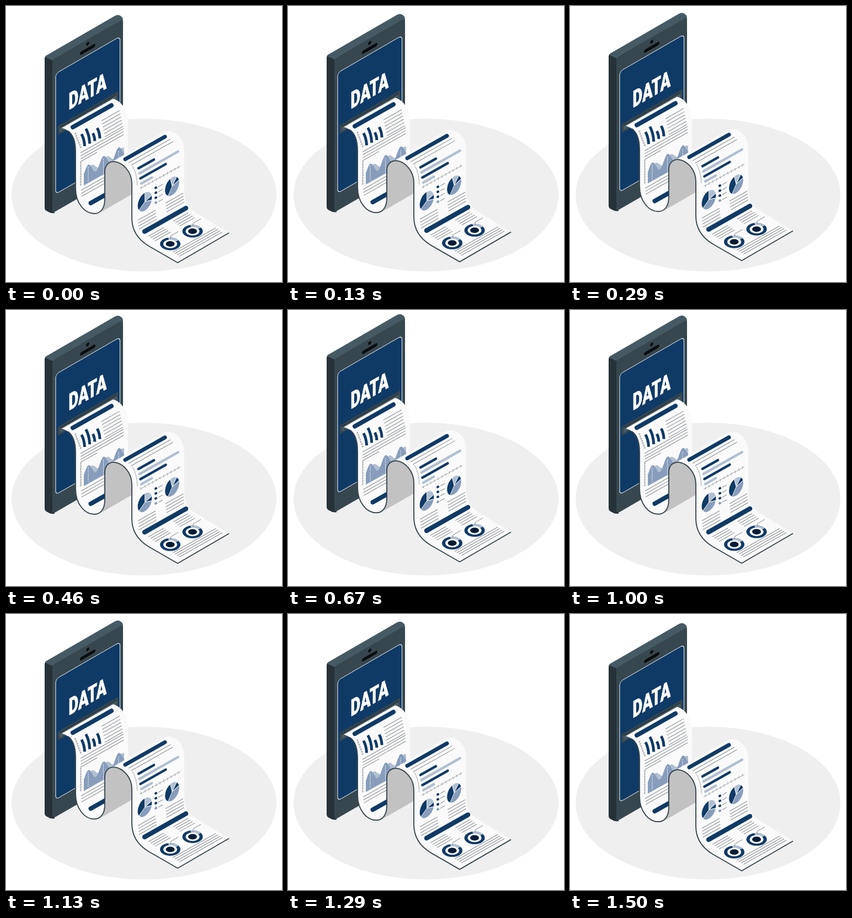
Recreate the animation shown at these times as an HTML page. Size 500 by 500 pixels, loop 1540 ms.

```html
<!DOCTYPE html>
<html lang="en">
<head>
<meta charset="utf-8">
<title>Data report</title>
<style>
  html, body { margin: 0; height: 100%; overflow: hidden; background: #fff; }
  svg { display: block; width: 100%; height: 100%; }
  text { font: 900 42px Roboto, sans-serif; fill: #fff; stroke: #fff; stroke-width: .8; stroke-linejoin: round; }
</style>
</head>
<body>
<svg viewBox="0 0 500 500">
  <ellipse cx="250" cy="342.5" rx="240" ry="138.5" fill="#efefef"/>
  <g id="float">
    <!-- phone: side, top, then everything on the skewed front -->
    <path fill="#263238" d="M70 96Q70 91 74 89L88 97V375Q81 376 77 373L73 371Q70 369 70 365Z"/>
    <path fill="#455a64" d="M71 92.500Q72 90.500 75 88.500L197 18Q202 15 206 17L209 19Q212 21 212 27L88 99Q84 99 83 98Z"/>
    <g transform="matrix(1 -.577 0 1 84 97.500)">
      <rect width="128" height="278" rx="5" fill="#37474f"/>
      <rect x="6" y="28.500" width="116.500" height="218" rx="6" fill="#103a66" stroke="#f4f6f8"/>
      <path d="M53 18H75" stroke="#0a0d0f" stroke-width="6" stroke-linecap="round"/>
      <circle cx="64" cy="8" r="3" fill="#0a0d0f"/>
      <text transform="translate(29.500 108) scale(.65 1)">DATA</text>
      <rect x="9.500" y="126" width="110" height="16" fill="#37474f"/>
      <rect x="13" y="129" width="103.500" height="10" fill="#455a64"/>
      <path d="M13 130H116.500" stroke="#263238" stroke-width="2"/>
    </g>

    <path fill="#fafafa" d="M101 221L194 168C207 171 220 186 221 208V264L195 290L179 300V350C179 368 170 376 160 376C143 376 126 358 126 330V264C126 238 117 225 101 221Z"/>
    <g id="upper"></g>
    <path fill="#c2c2c2" d="M179 300C179 288 187 281 197 282C212 284 228 300 228 322V341L171 374Q179 366 179 350Z"/>
    <path fill="#fafafa" d="M187 285L285 229C300 221 323 235 323 262V338C323 356 331 366 345 375L404 411L311 465L258 434.500C236 421 228 404 228 384V322C228 300 212 284 197 282Q191 282 187 285Z"/>
    <path fill="none" stroke="#37474f" stroke-width="1.900" stroke-linejoin="round" d="M112 226C122 233 126 246 126 264V330C126 358 143 376 160 376C170 376 179 368 179 350V300C179 288 187 281 197 282C212 284 228 300 228 322V384C228 404 236 421 258 434.500L311 465L404 411"/>
    <g id="lower"></g>
  </g>
</svg>
<script>
const NAVY = '#103a66', MID = '#879dbb', PALE = '#b0bfd2', GRAY = '#8b9093', PAPER = '#fafafa';
const SLOPE = -.565;

let layer;
const useLayer = id => layer = document.getElementById(id);

function add(tag, attrs) {
  const el = document.createElementNS('http://www.w3.org/2000/svg', tag);
  for (const key in attrs) el.setAttribute(key, attrs[key]);
  layer.append(el);
}

const stroke = (d, color = GRAY, width = 1.1, extra = {}) =>
  add('path', { d, fill: 'none', stroke: color, 'stroke-width': width, ...extra });

// Segment running along the shared isometric slope
const along = (x, y, length) => `M${x} ${y}l${length} ${length * SLOPE}`;

const bar = (x, y, length, color, width) =>
  stroke(along(x, y, length), color, width, { 'stroke-linecap': 'round' });

// Lines of text, each shifted by (dx, dy)
function rows(x, y, length, count, dx = .6, dy = 5.4) {
  for (let i = 0; i < count; i++) stroke(along(x + i * dx, y + i * dy, length));
}

// Axis with evenly spaced tick marks of half-size (tx, ty)
function axis(x, y, w, h, count, tx, ty) {
  let d = `M${x} ${y}l${w} ${h}`;
  for (let i = 0; i < count; i++) {
    const k = (i + .5) / count;
    d += `M${x + w * k - tx} ${y + h * k - ty}l${2 * tx} ${2 * ty}`;
  }
  stroke(d, GRAY, .8);
}

// Column chart leaning back with the curl of the paper
function columns(x, y, heights) {
  heights.forEach((h, i) => {
    const bx = x + i * 9.2, by = y - i * 4.7;
    stroke(`M${bx} ${by}q${-h * .03} ${-h * .6} ${-h * .26} ${-h}`, NAVY, 5);
  });
}

// Wavy area over a sloping base
function area(color, amplitude, shift) {
  let d = 'M141 325';
  for (let x = 141; x <= 214; x++) {
    const wave = Math.cos((x - 149 - shift) / 27.5 * 2 * Math.PI);
    d += `L${x} ${302 + (x - 141) * SLOPE - amplitude * wave}`;
  }
  add('path', { d: d + 'V284Z', fill: color });
}

// Slices are [end angle, colour], clockwise from the start angle
function pie(x, y, start, slices) {
  const r = 15.3;
  const at = deg => [r * Math.sin(deg * Math.PI / 180), -r * Math.cos(deg * Math.PI / 180)];
  for (const [end, fill] of slices) {
    add('path', {
      d: `M0 0L${at(start)}A${r} ${r} 0 0 1 ${at(end)}Z`,
      fill, stroke: PAPER, 'stroke-width': .9,
      transform: `matrix(.866 -.5 0 1.08 ${x} ${y})`
    });
    start = end;
  }
}

function donut(x, y) {
  const disc = (r, fill) => add('ellipse', { cx: x, cy: y, rx: r, ry: r * .62, fill });
  disc(18.5, NAVY);
  add('path', { d: `M${x} ${y}l-4 -11.2q12 -1.8 19 4.7z`, fill: PALE });
  disc(12.5, PAPER);
  disc(8, '#071c36');
  stroke(`M${x + 1} ${y - 10}v-4.500l14 -8`, '#606a70', .8);
}

useLayer('upper');
bar(121, 219.5, 70, NAVY, 8);
columns(142.5, 254, [22, 27, 14, 19]);
axis(125, 229, 11, 29, 7, 2, -1);
rows(173, 208, 33, 6, 1.2, 5.8);
rows(135, 266, 78, 3, .2);
rows(135, 282, 30, 1);
area(PALE, 6, 6);
area(MID, 10, 0);
for (let i = 0; i < 3; i++)
  stroke(`M${149 + i * 27.5} ${291 - i * 14}v28`, '#fff', 1, { 'stroke-dasharray': '2 1.5' });
axis(135.5, 282, 0, 44, 9, 1.7, -1);
rows(136, 334, 43, 3);
bar(153.5, 357, 28, NAVY, 8);

useLayer('lower');
bar(216, 277.5, 72, NAVY, 7);
rows(222, 284, 76, 2, 4.5, 4.5);
stroke('M229 290Q237 302 238 325', GRAY, .8);
[28, 70, 46, 19].forEach((length, i) =>
  bar(240 + i * 1.7, 294 + i * 9.2, length, i % 2 ? PALE : NAVY, 4.5));
axis(242, 331, 74, -41, 11, .3, 2.3);
pie(251.5, 354.5, 0, [[75, PALE], [105, NAVY], [235, MID], [360, NAVY]]);
pie(301, 326.5, -15, [[40, PALE], [75, NAVY], [215, MID], [345, NAVY]]);
for (let i = 0; i < 4; i++) {
  const y = 329.5 + i * 9;
  bar(271, y, 1, i < 3 ? NAVY : MID, 4.2);
  rows(276, y - 2, 8, 1);
}
rows(239, 388, 32, 4);
rows(289, 357, 32, 4);
bar(251, 408.5, 75, NAVY, 8.5);
rows(258, 417, 28, 4, 4, 2.8);
rows(303, 390, 27, 4, 4, 2.8);
rows(302, 446, 78, 4, 4, 2.5);
donut(297.5, 431);
donut(338, 408);

// Steady rise and fall
const PERIOD = 1540, PHASE = 30, LIFT = 10, REST = .4;
function frame() {
  const p = (performance.now() + PHASE) % PERIOD / PERIOD;
  const y = REST - LIFT * (1 - Math.abs(1 - 2 * p));
  document.getElementById('float').setAttribute('transform', `translate(0 ${y})`);
  requestAnimationFrame(frame);
}
frame();
</script>
</body>
</html>
```
